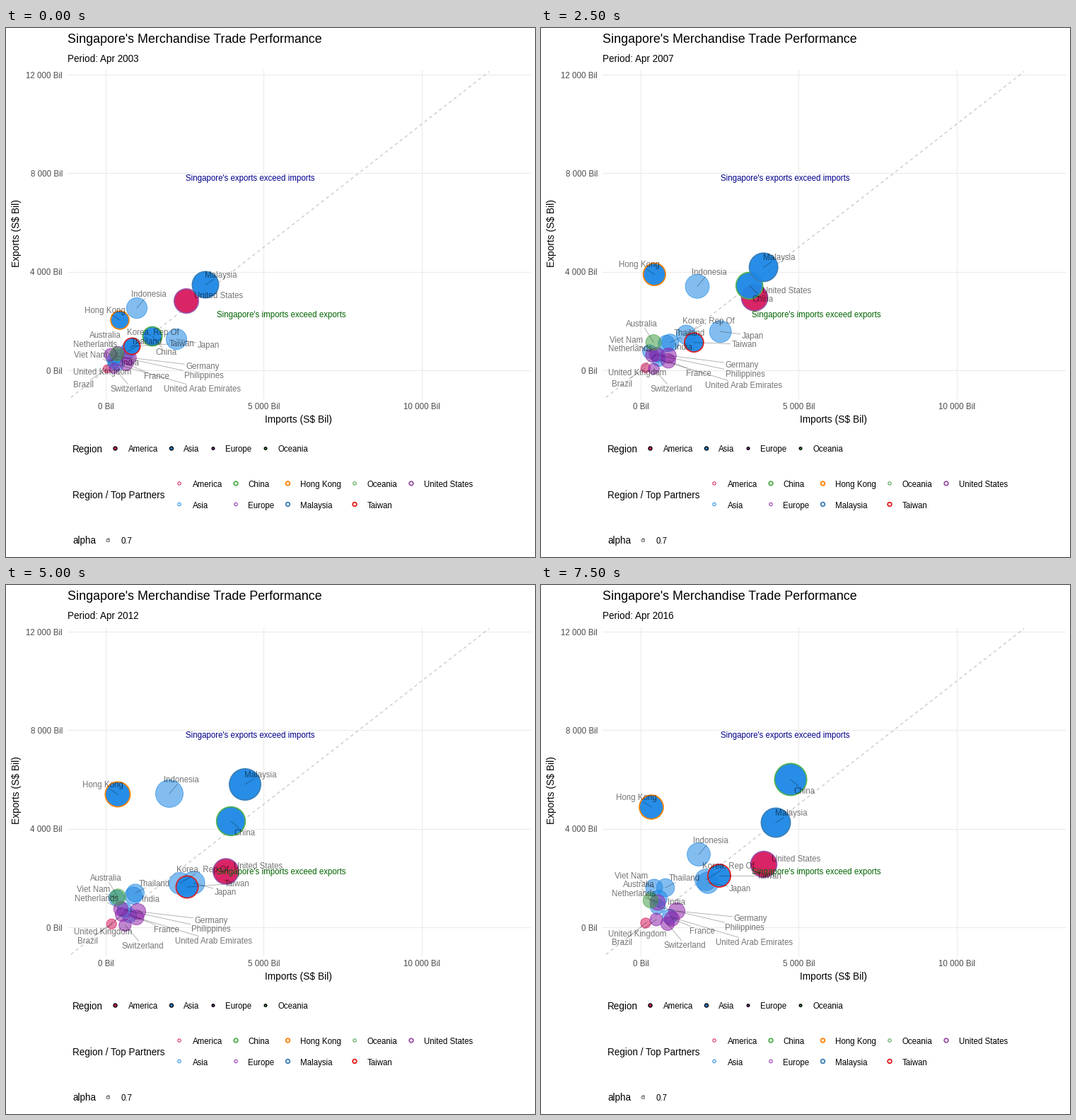
A matplotlib script for the animation above (8 s loop, 748 by 748 pixels).

```python
import math
from itertools import combinations

import numpy as np
import matplotlib.pyplot as plt
from matplotlib.animation import FuncAnimation
from matplotlib.colors import to_rgba
from matplotlib.patches import Circle

SIZE, DPI = 748, 64
STEPS, INTERVAL = 16, 500
X0, Y0, SX, SY = 141, 484, 0.0447, 0.03483   # pixel origin and pixels per unit
KEYS = {3: (0, 7, 15), 6: (0, 4, 7, 10, 12, 15)}   # steps of a path's points
LABEL, LINE = 11.5, 12.5                     # label size and least spacing

PINK, BLUE, PURPLE, GREEN = "#D81B60", "#1E88E5", "#8E24AA", "#43A047"
TOP = {"United States": "#984EA3", "China": "#4DAF4A", "Hong Kong": "#FF7F00",
       "Malaysia": "#377EB8", "Taiwan": "#E41A1C"}

plt.rcParams["font.family"] = "Liberation Sans"
fig = plt.figure(figsize=(SIZE / DPI, SIZE / DPI), dpi=DPI, facecolor="white")
ax = fig.add_axes([0, 0, 1, 1])
ax.set(xlim=(0, SIZE), ylim=(SIZE, 0))
ax.axis("off")


def pt(px):
    return px * 72 / DPI


def text(x, mid, s, size=LABEL, color="black", **kw):
    """Text whose capitals are centred on the height `mid`."""
    return ax.text(x, mid + 0.358 * size, s, fontsize=pt(size), color=color,
                   va="baseline", **kw)


def ring(x, y, r, edge, width, fill="none", z=2):
    return ax.add_patch(Circle((x, y), r, facecolor=fill, edgecolor=edge,
                               linewidth=pt(width), zorder=z))


class Bubble:
    """A partner moving along `path`; its label prefers the offset `home`."""

    def __init__(self, name, fill, home, *path):
        self.home, self.path = home, np.array(path, float)
        top = name in TOP
        alpha = 0.96 if top else 0.55
        self.dot = ring(0, 0, 1, to_rgba(TOP.get(name, fill), alpha if top else 0.7),
                        1.8 if top else 0.9, to_rgba(fill, alpha), z=4 if top else 3)
        self.label = text(0, 0, name, alpha=0.54, zorder=7)
        self.line, = ax.plot([], [], color="black", alpha=0.38, lw=pt(0.75), zorder=6)
        self.width = self.label.get_window_extent(fig.canvas.get_renderer()).width

    def move(self, step):
        keys = KEYS[len(self.path)]
        self.x, self.y = (np.interp(step, keys, c) for c in self.path.T)
        total = max(0, (self.x - X0) / SX + (Y0 - self.y) / SY)
        self.dot.center = self.x, self.y
        self.dot.set_radius(3.9 + 0.18 * math.sqrt(total))
        self.lx = max(95, self.x + self.home[0])
        self.ly = min(510, self.y + self.home[1])

    def place(self):
        self.label.set_position((self.lx, self.ly + 0.358 * LABEL))
        cx, cy = self.lx + self.width / 2, self.ly
        dx, dy = self.x - cx, self.y - cy
        t = min((self.width / 2 + 2) / max(abs(dx), 1e-6), 6.5 / max(abs(dy), 1e-6))
        shown = t < 1 and (1 - t) * math.hypot(dx, dy) > 13
        self.line.set_data([cx + t * dx, self.x], [cy + t * dy, self.y])
        self.line.set_visible(shown)


def spread(items):
    """Push overlapping labels apart vertically, staying inside the panel."""
    for _ in range(40):
        for a, b in combinations(items, 2):
            across = min(a.lx + a.width, b.lx + b.width) - max(a.lx, b.lx)
            gap = b.ly - a.ly
            if across > 0 and abs(gap) < LINE:
                push = math.copysign((LINE - abs(gap)) / 2, gap)
                a.ly = min(510, a.ly - push)
                b.ly = min(510, b.ly + push)


def draw_plot():
    for v in (0, 5000, 10000):
        x = X0 + v * SX
        ax.plot([x, x], [60, 524], color="#EBEBEB", lw=pt(1.1), zorder=0)
        text(x, 534.5, f"{v:,} Bil".replace(",", " "), color="#4D4D4D", ha="center")
    for v in (0, 4000, 8000, 12000):
        y = Y0 - v * SY
        ax.plot([87, 741], [y, y], color="#EBEBEB", lw=pt(1.1), zorder=0)
        text(80, y + 0.5, f"{v:,} Bil".replace(",", " "), color="#4D4D4D", ha="right")
    ends = np.array([-1100, 12130])
    ax.plot(X0 + ends * SX, Y0 - ends * SY, color="#BEBEBE", lw=pt(1.1),
            dashes=(4, 4), dash_capstyle="butt", zorder=1)
    text(87, 15, "Singapore's Merchandise Trade Performance", 17.9)
    text(413.5, 553, "Imports (S$ Bil)", 13.7, ha="center")
    ax.text(15, 290.5, "Exports (S$ Bil)", fontsize=pt(13.7), rotation=90,
            ha="center", va="center")
    text(254, 212, "Singapore's exports exceed imports", color="#00008B", zorder=5)
    text(298, 405, "Singapore's imports exceed exports", color="#006400", zorder=5)


def draw_legends():
    text(94, 595, "Region", 13.5)
    for x, lx, s, c, r in ((154.5, 173, "America", PINK, 2.5), (234, 251, "Asia", BLUE, 2.5),
                           (293, 310, "Europe", PURPLE, 1.8), (367, 385, "Oceania", GREEN, 1.8)):
        ring(x, 594.5, r, "black", 1.4, c)
        text(lx, 595, s)

    text(94, 660, "Region / Top Partners", 13.5)
    columns = ((245, 264), (325, 342), (398.5, 416), (493, 511), (573, 591))
    rows = ((644.5, ("America", "China", "Hong Kong", "Oceania", "United States")),
            (674, ("Asia", "Europe", "Malaysia", "Taiwan")))
    regions = {"America": PINK, "Asia": BLUE, "Europe": PURPLE, "Oceania": GREEN}
    for y, names in rows:
        for (x, lx), s in zip(columns, names):
            if s in TOP:
                ring(x, y - 0.5, 2.8, TOP[s], 1.8)
            else:
                ring(x, y - 0.5, 2.2, regions[s], 1)
            text(lx, y + 0.5, s)

    text(94, 724.5, "alpha", 13.5)
    ring(144, 724.5, 2.1, "#7F7F7F", 1)
    text(144, 723.5, "a", 9.5, "#7F7F7F", ha="center", style="italic")
    text(163, 724.5, "0.7")


draw_plot()
draw_legends()
period = text(87, 43, "", 13.5)

bubbles = [
    Bubble("Brazil", PINK, (-48, 22), (143, 482), (150, 480), (148, 478)),
    Bubble("India", BLUE, (12, 5), (151, 469), (188, 437), (167, 443)),
    Bubble("Indonesia", BLUE, (-8, -20), (185, 396), (229, 359), (205, 378),
           (231, 295), (232, 333), (223, 381)),
    Bubble("Japan", BLUE, (30, 8), (241, 440), (263, 426), (235, 436),
           (265, 421), (254, 413), (236, 421)),
    Bubble("Korea, Rep Of", BLUE, (-5, -20), (176, 452), (206, 435), (204, 431),
           (246, 422), (263, 411), (233, 417)),
    Bubble("Philippines", BLUE, (95, 25), (157, 464), (169, 462), (165, 455)),
    Bubble("Thailand", BLUE, (5, -14), (172, 457), (187, 440), (176, 428)),
    Bubble("United Arab Emirates", BLUE, (65, 36), (158, 476), (170, 466), (182, 469)),
    Bubble("Viet Nam", BLUE, (-56, -12), (152, 474), (154, 451), (160, 428)),
    Bubble("France", PURPLE, (25, 17), (170, 475), (184, 469), (185, 472)),
    Bubble("Germany", PURPLE, (80, 14), (174, 466), (183, 462), (192, 461)),
    Bubble("Netherlands", PURPLE, (-65, -15), (148, 462), (161, 463), (165, 449)),
    Bubble("Switzerland", PURPLE, (-5, 30), (153, 481), (162, 482), (179, 479)),
    Bubble("United Kingdom", PURPLE, (-68, 25), (158, 460), (165, 462), (163, 473)),
    Bubble("Australia", GREEN, (-39, -27), (157, 461), (160, 438), (155, 446)),
    Bubble("United States", PINK, (11, -8), (255, 386), (312, 366), (282, 412),
           (311, 405), (348, 387), (315, 395)),
    Bubble("China", BLUE, (4, 16), (207, 436), (310, 361), (264, 371),
           (318, 334), (358, 290), (353, 275)),
    Bubble("Hong Kong", BLUE, (-50, -14), (161, 413), (162, 345), (157, 355),
           (158, 296), (162, 320), (156, 314)),
    Bubble("Malaysia", BLUE, (-1, -14), (282, 363), (328, 326), (288, 363),
           (338, 282), (327, 262), (332, 336)),
    Bubble("Taiwan", BLUE, (53, 0), (178, 450), (223, 443), (203, 448),
           (256, 427), (312, 413), (252, 411)),
]


def update(step):
    period.set_text(f"Period: Apr {2003 + int(0.3 + 0.875 * step)}")
    for b in bubbles:
        b.move(step)
    spread(bubbles)
    for b in bubbles:
        b.place()
    return []


anim = FuncAnimation(fig, update, frames=STEPS, interval=INTERVAL,
                     init_func=lambda: update(0), repeat=True, repeat_delay=0)
plt.show()
```
